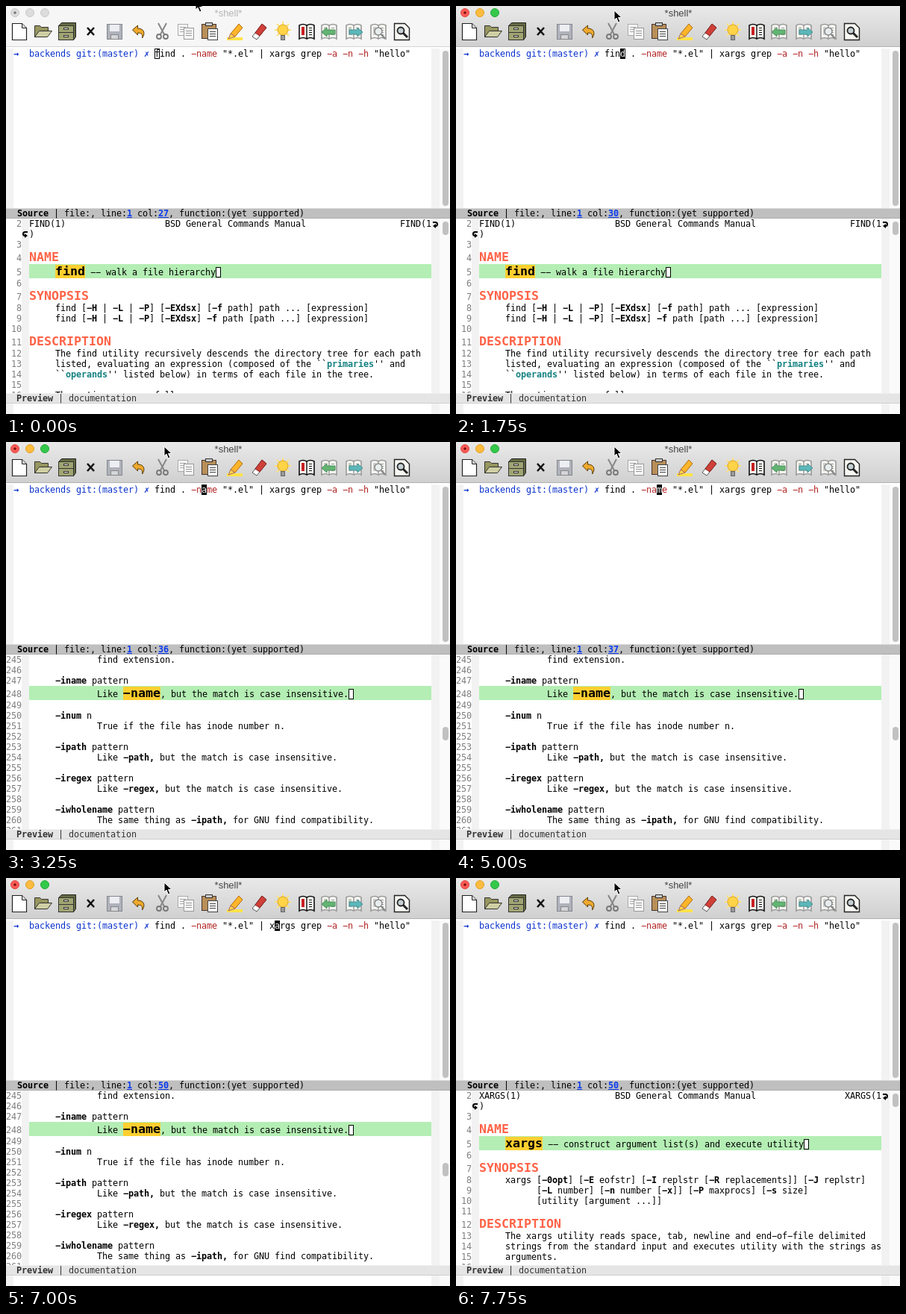
An HTML page with a canvas that plays this animation: 595x547 px, repeating every 8 s.

```html
<!DOCTYPE html>
<html lang="en">
<head>
<meta charset="utf-8">
<title>Shell with documentation preview</title>
<style>
html, body { margin: 0; width: 100%; height: 100%; overflow: hidden; background: #fff; }
canvas { display: block; }
</style>
</head>
<body>
<canvas id="stage" width="595" height="547"></canvas>
<script>
const ctx = document.getElementById('stage').getContext('2d');
const LOOP = 8000, STEP = 250, CELL = 7, BIG_CELL = 10;
const MONO = '"DejaVu Sans Mono", "DejaVu Sans", monospace';

// Each marker character toggles a text style.
const STYLES = {
  '@': { bold: true },
  '~': { bold: true, color: '#148080' },
  '^': { bold: true, big: true, back: '#ffcf30' },
  '#': { bold: true, big: true, color: '#ff6347' },
  '$': { color: '#0a32cd' },
  '%': { color: '#b22222' },
  '_': { bold: true, color: '#0a3cf0', underline: true },
};

const header = name =>
  (name.padEnd(26) + 'BSD General Commands Manual').padEnd(78 - name.length) + name.slice(0, -1);
const indent = (n, text) => ' '.repeat(n) + text;

const FIND = { first: 2, thumb: 289, wrapped: true, lines: [
  header('FIND(1)'), ')', '', '#NAME#', indent(5, '^find^ -- walk a file hierarchy'), '',
  '#SYNOPSIS#',
  indent(5, 'find [@-H@ | @-L@ | @-P@] [@-EXdsx@] [@-f@ path] path ... [expression]'),
  indent(5, 'find [@-H@ | @-L@ | @-P@] [@-EXdsx@] @-f@ path [path ...] [expression]'), '',
  '#DESCRIPTION#',
  indent(5, 'The find utility recursively descends the directory tree for each path'),
  indent(5, "listed, evaluating an expression (composed of the ``~primaries~'' and"),
  indent(5, "``~operands~'' listed below) in terms of each file in the tree."), '',
  indent(5, 'The options are as follows:'),
] };

const NAME = { first: 245, thumb: 382, lines: [
  indent(13, 'find extension.'), '',
  indent(5, '@-iname@ pattern'),
  indent(13, 'Like ^-name^, but the match is case insensitive.'), '',
  indent(5, '@-inum@ n'),
  indent(13, 'True if the file has inode number n.'), '',
  indent(5, '@-ipath@ pattern'),
  indent(13, 'Like @-path,@ but the match is case insensitive.'), '',
  indent(5, '@-iregex@ pattern'),
  indent(13, 'Like @-regex,@ but the match is case insensitive.'), '',
  indent(5, '@-iwholename@ pattern'),
  indent(13, 'The same thing as @-ipath,@ for GNU find compatibility.'), '',
] };

const XARGS = { first: 2, thumb: 289, wrapped: true, lines: [
  header('XARGS(1)'), ')', '', '#NAME#',
  indent(5, '^xargs^ -- construct argument list(s) and execute utility'), '',
  '#SYNOPSIS#',
  indent(5, 'xargs [@-0opt@] [@-E@ eofstr] [@-I@ replstr [@-R@ replacements]] [@-J@ replstr]'),
  indent(11, '[@-L@ number] [@-n@ number [@-x@]] [@-P@ maxprocs] [@-s@ size]'),
  indent(11, '[utility [argument ...]]'), '',
  '#DESCRIPTION#',
  indent(5, 'The xargs utility reads space, tab, newline and end-of-file delimited'),
  indent(5, 'strings from the standard input and executes utility with the strings as'),
  indent(5, 'arguments.'), '',
] };

const COMMAND = '$@→@  backends git:(master) ✗$ find . %-name% "*.el" | xargs grep %-a% %-n% %-h% "hello"';
const PLAIN_COMMAND = COMMAND.replace(/[@$%]/g, '');

function box(x, y, w, h, fill, stroke) {
  ctx.fillStyle = fill;
  ctx.fillRect(x, y, w, h);
  if (stroke) outline(x, y, w, h, stroke);
}
function outline(x, y, w, h, color) {
  ctx.strokeStyle = color;
  ctx.lineWidth = 1;
  ctx.strokeRect(x + .5, y + .5, w - 1, h - 1);
}
function shape(d, fill, stroke, width = 1) {
  const path = new Path2D(d);
  if (fill) { ctx.fillStyle = fill; ctx.fill(path); }
  if (stroke) { ctx.strokeStyle = stroke; ctx.lineWidth = width; ctx.stroke(path); }
}
function disc(x, y, r, fill, stroke, width = 1) {
  ctx.beginPath();
  ctx.arc(x, y, r, 0, 7);
  if (fill) { ctx.fillStyle = fill; ctx.fill(); }
  if (stroke) { ctx.strokeStyle = stroke; ctx.lineWidth = width; ctx.stroke(); }
}
function pill(x, y, w, h, fill) {
  ctx.beginPath();
  ctx.roundRect(x, y, w, h, w / 2);
  ctx.fillStyle = fill;
  ctx.fill();
}

// Writes marked-up text on the character grid and returns the end position.
function write(x, base, text, color = '#000') {
  let style = {};
  for (const ch of text) {
    if (STYLES[ch]) {
      const same = style.mark === ch;
      const outer = style.outer || {};
      style = same ? outer : { ...style, ...STYLES[ch], mark: ch, outer: style };
      continue;
    }
    const cell = style.big ? BIG_CELL : CELL;
    if (style.back) box(x, base - 14, cell, 18, style.back);
    ctx.font = `${style.bold ? 'bold ' : ''}${style.big ? 16.6 : 11.8}px ${MONO}`;
    ctx.fillStyle = style.color || color;
    ctx.fillText(ch === '-' ? '−' : ch, x, base);
    if (style.underline) ctx.fillRect(x, base + 1, cell, 1);
    x += cell;
  }
  return x;
}

function book(x, cover, ink) {
  shape(`M${x} 26q5-3 10 0q5-3 10 0v18q-5-3-10 0q-5-3-10 0z`, '#f8f8f4', ink, 1.6);
  shape(`M${x + 10} 26v18`, null, ink, 1.4);
  box(x + 3, 28, 4, 11, cover);
  for (let y = 29; y < 40; y += 3) box(x + 13, y, 4, 1, ink);
}
function sheet(x, y, w, h, ink) {
  box(x, y, w, h, '#f5f5f5', ink);
  for (let row = y + 4; row < y + h - 3; row += 3) box(x + 3, row, w - 6, 1, ink);
}

function toolbar() {
  shape('M8.5 23.5h13l6 6v16h-19z', '#fff', '#222', 1.2);
  shape('M21.5 23.5v6h6', '#ddd', '#222');
  shape('M38.5 41.5v-15h7l2 2h9v5h-11z', '#96965f', '#333');
  shape('M38.5 41.5l6-8h17l-6 8z', '#cfcfa4', '#333');
  shape('M70.5 26.5l4-4h19v19l-3 4h-20z', '#646a42', '#222');
  box(70, 26, 21, 20, '#a0a573', '#333');
  box(71, 35, 19, 1, '#333');
  for (const y of [29, 39]) box(77, y, 7, 3, '#eee', '#333');
  shape('M109 29l9 10M118 29l-9 10', null, '#111', 2.6);
  box(135, 24, 21, 21, '#b0b2bb', '#85878f');
  box(139, 25, 13, 9, '#eceef2');
  box(140, 38, 11, 7, '#d4d5d9', '#888');
  shape('M169.5 32l7-6v4c8 0 11 6 6 13c1-5-1-7-6-7v3z', '#efa92c', '#553a08');
  shape('M204 23l8 15M215 23l-8 15', null, '#888', 2);
  disc(205, 41, 3, null, '#777', 1.8);
  disc(214, 41, 3, null, '#777', 1.8);
  sheet(230, 24, 14, 16, '#aaa');
  sheet(238, 29, 14, 16, '#999');
  box(262, 24, 20, 20, '#b98f58', '#433');
  box(267, 22, 10, 5, '#ccc', '#333');
  sheet(270, 30, 14, 16, '#444');
  shape('M296 44h21', null, '#ffe34a', 4);
  shape('M301 37l11-13 5 5-10 12z', '#ffb52a', '#b06a10');
  shape('M301 37l6 4-9 3z', '#ffd84a', '#a66');
  shape('M330 41l13-17 6 5-13 16z', '#fff', '#555');
  shape('M334 36l9-12 6 5-9 11z', '#cf4038', '#822');
  shape('M360 32h22M371 21v20M363 24l16 16M379 24l-16 16', null, '#ffe17a', 2);
  disc(371, 32, 7, '#ffd447', '#e0a320');
  box(368, 39, 6, 7, '#999', '#666');
  book(393, '#c82020', '#111');
  book(423, '#c3cabd', '#999');
  shape('M423 35l7-6v3h11v6h-11v3z', '#62b572', '#4d8e5b');
  book(456, '#c3cabd', '#999');
  shape('M478 35l-7-6v3h-11v6h11v3z', '#5cb7b9', '#4b8e91');
  book(489, '#ccc', '#999');
  disc(499, 34, 5, '#e8eeee', '#888', 1.5);
  shape('M503 38l5 6', null, '#888', 2.5);
  shape('M520.5 23.5h14l6 6v16h-20z', '#f6f6f2', '#222', 1.4);
  disc(529, 33, 4.5, '#c5d0d4', '#222', 1.8);
  shape('M532 36l6 6', null, '#222', 3);
}

function titleBar(active) {
  const shade = ctx.createLinearGradient(0, 0, 0, 54);
  shade.addColorStop(0, active ? '#e9e9e9' : '#f6f6f6');
  shade.addColorStop(1, active ? '#d0d0d0' : '#f6f6f6');
  box(0, 0, 595, 54, shade);
  box(0, 54, 595, 1, active ? '#b2b2b2' : '#d4d4d4');
  const lights = active ? ['#fc5b57', '#fdbc40', '#34c84a'] : Array(3).fill('#dcdcdc');
  const rims = active ? ['#e0443f', '#dfa023', '#24aa35'] : Array(3).fill('#cacaca');
  lights.forEach((color, i) => disc(12 + 20 * i, 9, 5.5, color, rims[i]));
  disc(12, 9, 1.8, active ? '#7a0e0a' : '#777');
  ctx.font = '13px "Liberation Sans", sans-serif';
  ctx.fillStyle = active ? '#444' : '#b4b4b4';
  ctx.textAlign = 'center';
  ctx.fillText('*shell*', 298, 14);
  ctx.textAlign = 'left';
  toolbar();
}

function pane(left, top, bottom, thumbTop, thumbHeight) {
  box(left, top, 10, bottom - top, '#f2f2f2');
  box(570, top, 11, bottom - top, '#f2f2f2');
  box(581, top, 14, bottom - top, '#fafafa');
  if (thumbHeight) pill(585, thumbTop, 8, thumbHeight, '#c1c1c1');
}

function modeLine(y, x, text, fill, color) {
  box(0, y, 595, 14, fill);
  box(0, y, 595, 1, '#ffffff60');
  box(0, y + 13, 595, 1, '#00000018');
  write(x, y + 11, text, color);
}

function shell(col, cursor) {
  pane(0, 57, 271, 60, 208);
  write(10, 68, COMMAND);
  const x = 10 + col * CELL;
  if (cursor === 'hollow') outline(x, 57, CELL, 14, '#000');
  if (cursor === 'solid') {
    box(x, 57, CELL, 14, '#000');
    write(x, 68, PLAIN_COMMAND[col], '#fff');
  }
  modeLine(271, 15, `@Source@ | file:, line:_1_ col:_${col}_, function:(yet supported)`, '#bfbfbf');
}

function preview({ first, thumb, wrapped, lines }) {
  pane(21, 285, 519, thumb, 18);
  let y = 285, number = first;
  lines.forEach((text, i) => {
    const match = text.includes('^');
    const height = match || text.includes('#') ? 19 : 14;
    const base = y + height - (height > 14 ? 4 : 3);
    if (match) box(31, y, 539, height, '#b4eeb4');
    if (!(wrapped && i === 1)) write(0, base, String(number++).padStart(3), '#7f7f7f');
    const end = write(31, base, text);
    if (match) box(end, base - 11, CELL, 14, '#fff', '#000');
    y += height;
  });
  if (wrapped) {
    shape('M572 290h3.5a2.2 2.2 0 0 1 0 5h-1', null, '#000', 2);
    shape('M576 292v6l-4-3z', '#000');
    shape('M29 303h-3.5a2.2 2.2 0 0 0 0 5h1', null, '#000', 2);
    shape('M25 305v6l4-3z', '#000');
  }
  box(0, 519, 595, 28, '#fff');
  pane(0, 533, 547);
  modeLine(519, 14, '@Preview@ | documentation', '#e5e5e5', '#333');
}

function pointer(x, y) {
  shape(`M${x} ${y}v13l3-3 2.5 6 2.5-1-2.5-5.5h4.5z`, '#000', '#fff', 1);
}

function columnAt(t) {
  if (t < 1250) return 27;
  if (t < 2500) return Math.min(32, 28 + (t - 1250) / STEP);
  if (t < 2750) return 34;
  if (t < 5000) return 36;
  return Math.min(50, Math.round(37 + 13 * (t - 5000) / 2000));
}
function cursorAt(t) {
  if (t < 750) return 'hollow';
  const hidden = (t >= 3500 && t < 4000) || (t >= 4500 && t < 5000) || t >= 7750;
  return hidden ? 'none' : 'solid';
}

function draw(t) {
  box(0, 0, 595, 547, '#fff');
  titleBar(t >= 750);
  shell(columnAt(t), cursorAt(t));
  preview(t < 3250 ? FIND : t < 7500 ? NAME : XARGS);
  if (t < 250) pointer(254, -8);
  else if (t < 500) pointer(234, 0);
  else pointer(212, 6);
}

const start = performance.now();
function tick() {
  const elapsed = (performance.now() - start) % LOOP;
  draw(Math.floor(elapsed / STEP) * STEP);
  requestAnimationFrame(tick);
}
tick();
</script>
</body>
</html>
```
